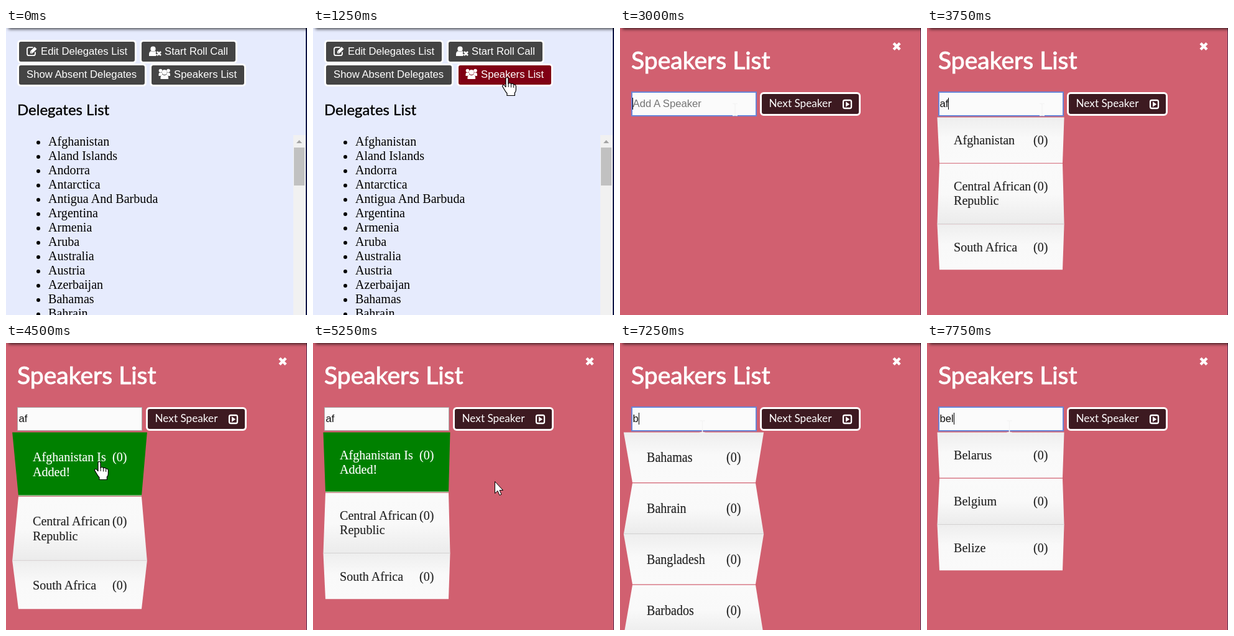
These frames come from a looping animation (484 px wide and 461 px high, 8 s). An HTML page:

```html
<!DOCTYPE html>
<html lang="en">
<head>
<meta charset="utf-8">
<title>Delegates List</title>
<style>
html, body { margin: 0; width: 100%; height: 100%; overflow: hidden; background: #e6ebfd; }
svg { display: block; width: 484px; height: 461px; }
.sans { font: 16.7px "Liberation Sans", Arial, sans-serif; }
.serif { font: 20.1px "Liberation Serif", "Times New Roman", serif; }
.head { font-family: Lato, sans-serif; }
</style>
</head>
<body>
<svg viewBox="0 0 484 461">
  <defs>
    <filter id="blur" x="-5%" y="-200%" width="110%" height="500%"><feGaussianBlur stdDeviation="2.4"/></filter>
    <linearGradient id="odd" x2="0" y2="1"><stop stop-color="#eeeeee"/><stop offset=".45" stop-color="#f9f9f9"/><stop offset="1" stop-color="#fafafa"/></linearGradient>
    <linearGradient id="even" x2="0" y2="1"><stop stop-color="#fafafa"/><stop offset=".5" stop-color="#f9f9f9"/><stop offset="1" stop-color="#ebebeb"/></linearGradient>
  </defs>

  <rect width="484" height="461" fill="#e6ebfd"/>
  <g id="buttons"></g>
  <g fill="#fff" stroke="none">
    <!-- edit -->
    <path d="M43.5 31.2H37a3 3 0 0 0-3 3v7a3 3 0 0 0 3 3h7a3 3 0 0 0 3-3v-2.6" fill="none" stroke="#fff" stroke-width="1.8"/>
    <path d="M39 37.2l7-7 3.5 3.5-7 7H39z"/>
    <path d="M40.3 38.2l1.4 1.4" stroke="#444" stroke-width="1"/>
    <!-- absent user -->
    <circle cx="236.5" cy="33.7" r="4.1"/>
    <path d="M230 45v-2c0-4 1.5-5.7 3.6-5.7q2.9 2 5.8 0c1 0 1.800.4 2.4 1L240.5 40.5l2 2L241 45z"/>
    <path d="M243 38l6 6m0-6l-6 6" stroke="#fff" stroke-width="2.6"/>
    <!-- group -->
    <circle cx="248.5" cy="68.5" r="2.8"/><circle cx="261" cy="68.5" r="2.8"/><circle cx="254.8" cy="71" r="3.9"/>
    <path d="M245.5 77v-2.5c0-2 1-3 2.5-3h3q-.5 3 1 4-3 0-3.5 1.5zM264 77v-2.5c0-2-1-3-2.5-3h-3q.5 3-1 4 3 0 3.5 1.5z"/>
    <path d="M248.5 82v-2c0-3.5 1.5-5 3.5-5q2.8 1.8 5.6 0c2 0 3.5 1.5 3.5 5v2z"/>
  </g>
  <text class="head" x="18" y="140" font-size="24" stroke="#000" stroke-width=".4">Delegates List</text>
  <g id="names" class="serif"></g>
  <rect x="462" y="172" width="20" height="289" fill="#f1f1f1"/>
  <rect x="463" y="192" width="17" height="61" fill="#c1c1c1"/>
  <path d="M467 185h9l-4.5-5z" fill="#a3a3a3"/>
  <rect x="482" width="2" height="461" fill="#0b1445"/>

  <g id="panel">
    <rect width="483.4" height="461" fill="#d16070"/>
    <text class="head" x="18" y="66" font-size="39.1" fill="#fff" stroke="#fff" stroke-width=".9">Speakers List</text>
    <path d="M440 24.5l10 10m0-10l-10 10" stroke="#fff" stroke-width="4.5"/>
    <rect id="field"/>
    <rect id="mark" x="20" y="112" width="15" height="20" fill="#3390ff"/>
    <text id="value" class="sans" x="20.5" y="127"></text>
    <rect id="caret" y="112" width="1" height="19"/>
    <rect x="226.5" y="104.5" width="159" height="35" rx="4.5" fill="#3d1a21" stroke="#fff" stroke-width="3"/>
    <text class="head" x="239.5" y="127" font-size="17.2" fill="#fff">Next Speaker</text>
    <rect x="359" y="116" width="13" height="13" rx="2.5" fill="none" stroke="#fff" stroke-width="2.3"/>
    <path d="M363 118.3v8.4l6.2-4.2z" fill="#fff"/>
    <text id="queue" class="serif" x="48" y="178" fill="#fff" stroke="#fff" stroke-width=".25">1. Afghanistan</text>
    <g id="drop" class="serif"></g>
  </g>

  <rect x="4" y="-12" width="510" height="14" opacity=".68" filter="url(#blur)"/>

  <g id="arrow"><path d="M.5 .5V19.5L5 15.5l3 7 3-1.3-3-6.7h5.5z" fill="#fff" stroke="#000"/></g>
  <g id="hand"><path d="M-2 2.5Q-2 .5 0 .5T2 2.5V11q.5-1.5 2.3-1.5T6.5 11.3q.5-1 2-1t2.2 1.7q3.5-.5 3.7 2.5v5.5q0 3-2 5V29.5H0V26q-2-2-4.5-6.5l-3-5q0-2.2 2-2 2 .5 3.5 3.5z" fill="#fff" stroke="#000" stroke-width="1.2"/><path d="M2.2 11v5M6.5 11.5V16.5M10.7 12.5v4.5" stroke="#000"/></g>
  <g id="beam"><path d="M-4-9.5h3l1 1 1-1h3M-4 9.5h3l1-1 1 1h3M0-8.5v17" fill="none" stroke="#f5f5f5" stroke-width="1.6"/></g>
</svg>
<script>
const $ = id => document.getElementById(id);
const LOOP = 8000, STEP = 250;
const still = [250, 1500, 3250, 4750, 5750];   // ticks on which nothing moves

const buttons = [
  [21, 22, 186, 32, 56, 'Edit Delegates List'],
  [218, 22, 151, 32, 255, 'Start Roll Call'],
  [21, 60, 202, 31, 33, 'Show Absent Delegates'],
  [234, 60, 149, 31, 270, 'Speakers List']
];
$('buttons').innerHTML = buttons.map(([x, y, w, h, tx, label], i) =>
  `<rect x="${x - 1.5}" y="${y - 1.5}" width="${w + 3}" height="${h + 3}" rx="4.5" fill="#444" stroke="#fff" stroke-width="3" id="b${i}"/>` +
  `<text class="sans" x="${tx}" y="${y + (i < 2 ? 21 : 20)}" fill="#fff">${label}</text>`).join('');

const names = ['Afghanistan', 'Aland Islands', 'Andorra', 'Antarctica', 'Antigua And Barbuda', 'Argentina',
  'Armenia', 'Aruba', 'Australia', 'Austria', 'Azerbaijan', 'Bahamas', 'Bahrain'];
$('names').innerHTML = names.map((n, i) =>
  `<circle cx="52" cy="${184 + 23 * i}" r="3"/><text x="68" y="${189 + 23 * i}">${n}</text>`).join('');

const matches = {
  af: ['Afghanistan', 'Central African|Republic', 'South Africa'],
  b: ['Bahamas', 'Bahrain', 'Bangladesh', 'Barbados', 'Belarus'],
  be: ['Belarus', 'Belgium', 'Belize', 'Benin', 'Bermuda'],
  bel: ['Belarus', 'Belgium', 'Belize']
};

const path = [
  [500, 'arrow', 397, 262], [1000, 'hand', 322, 88], [1250, 'hand', 312, 79], [1750, 'hand', 312, 79],
  [2000, 'arrow', 304, 78], [2750, 'beam', 185, 131], [3750, 'beam', 185, 131],
  [4000, 'hand', 170, 160], [4500, 'hand', 150, 190], [4750, 'hand', 150, 190],
  [5000, 'arrow', 306, 228], [5250, 'arrow', 292, 222], [5750, 'arrow', 292, 222],
  [6000, 'arrow', 240, 190], [6500, 'beam', 132.5, 136.5], [7000, 'beam', 132.5, 136.5], [7250, 'beam', 132.5, 134.5]
];

function movePointer(t) {
  const i = path.findLastIndex(k => k[0] <= t);
  const a = path[i], b = path[i + 1] || a;
  for (const kind of ['arrow', 'hand', 'beam'])
    $(kind).style.display = a && a[1] === kind ? '' : 'none';
  if (!a) return;
  const u = b === a ? 0 : (t - a[0]) / (b[0] - a[0]);
  $(a[1]).setAttribute('transform', `translate(${a[2] + (b[2] - a[2]) * u} ${a[3] + (b[3] - a[3]) * u})`);
}

function textAt(t) {
  if (t < 3500) return '';
  if (t < 7000) return 'af';
  return 'bel'.slice(0, (t - 7000) / STEP);
}

// Extra stretch of the folded list: it swings past its rest, then settles.
const swing = (amp, dt) => dt < 0 ? 0 : amp * Math.exp(-dt / 45);

function stretch(t) {
  if (t >= 7250) return 1 + swing(.1, t - 7250);
  if (t >= 6000) return Math.max(0, (6250 - t) / 500);
  return 1 + swing(.16, t - 3500) + swing(.06, t - 4500);
}

function foldList(items, s, added) {
  const spread = Math.max(0, s - 1) * 106;
  const wide = [16.5 - spread, 220.5 + spread], slim = [20, 218];
  let y = 143.5;
  return items.map((item, i) => {
    const green = added && i === 0, even = i % 2;
    const lines = (green ? item + ' Is|Added!' : item).split('|');
    const h = (74.3 + 23 * (lines.length - 1)) * s;
    const end = y + h - (even ? 0 : 1.2);
    const [a, b] = even ? [slim, wide] : [wide, slim];
    const fill = green ? '#008000' : `url(#${even ? 'even' : 'odd'})`;
    const ink = green ? '#fff' : '#222';
    const edge = green ? '#dfeadf' : even ? '#d2d0d0' : '';
    const svg = `<path d="M${a[0]} ${y}H${a[1]}L${b[1]} ${end}H${b[0]}z" fill="${fill}"/>` +
      (edge && `<path d="M${b[0]} ${end - .5}H${b[1]}" stroke="${edge}"/>`) +
      `<g transform="translate(0 ${y}) scale(1 ${s})" fill="${ink}" stroke="${ink}" stroke-width=".15">` +
      lines.map((l, n) => `<text x="43" y="${43.5 + 23 * n}">${l}</text>`).join('') +
      `<text x="171" y="43.5">(0)</text></g>`;
    y += h;
    return svg;
  }).join('');
}

function setField(focus) {
  const d = focus ? 1 : .5;
  const [x, y, w, h] = focus ? [18, 102, 202, 40] : [18, 103, 201, 38];
  const look = {
    x: x + d, y: y + d, width: w - 2 * d, height: h - 2 * d,
    fill: '#fbfbfb', stroke: focus ? '#6a84d6' : '#a9a9a9', 'stroke-width': 2 * d
  };
  for (const key in look) $('field').setAttribute(key, look[key]);
}

function draw(t) {
  $('b3').setAttribute('fill', t >= 1000 && t < 2000 ? '#800014' : '#444');

  const left = Math.min(1, Math.max(0, (2202 - t) / 600));
  $('panel').setAttribute('transform', `translate(${(-483 * left * left).toFixed(1)} 0)`);
  $('panel').style.display = t < 1750 ? 'none' : '';

  const text = textAt(t), focus = t >= 3000 && t < 4500 || t >= 6750;
  const picked = t >= 6750 && t < 7000;
  const value = $('value');
  setField(focus);
  value.textContent = text || 'Add A Speaker';
  value.setAttribute('fill', picked ? '#fff' : text ? '#111' : '#757575');
  $('mark').style.display = picked ? '' : 'none';
  $('caret').style.display = focus && !picked ? '' : 'none';
  $('caret').setAttribute('x', text ? Math.round(20.5 + value.getComputedTextLength()) : 20);

  $('queue').style.display = t >= 4500 ? '' : 'none';
  const s = stretch(t);
  $('drop').innerHTML = text && s > 0 ? foldList(matches[text], s, t >= 4500 && t < 7000) : '';
  movePointer(t);
}

let last = -1;
function tick() {
  let t = Math.floor(performance.now() % LOOP / STEP) * STEP;
  if (still.includes(t)) t -= STEP;
  if (t !== last) draw(last = t);
  requestAnimationFrame(tick);
}
tick();
</script>
</body>
</html>
```
